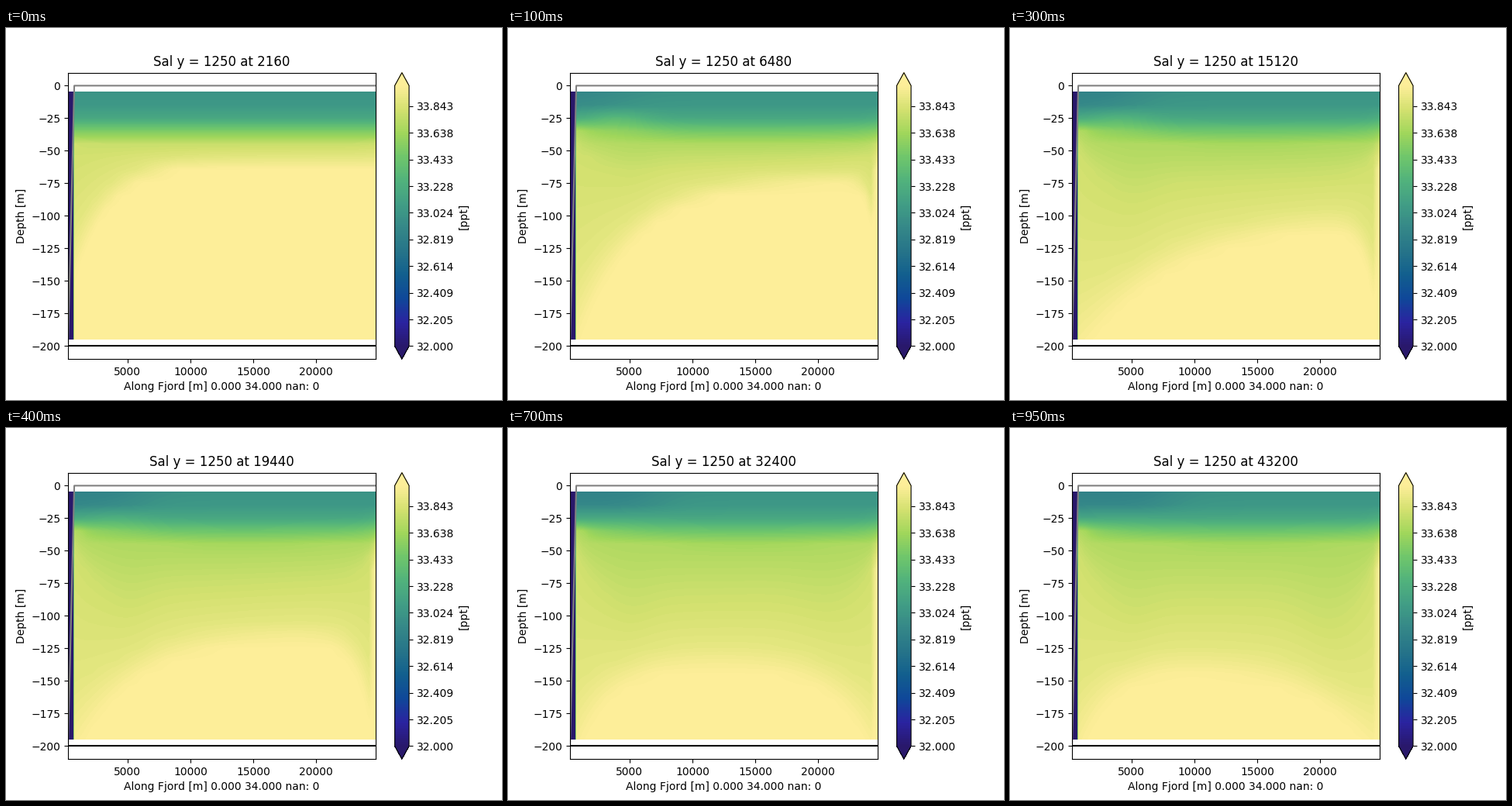
Recreate the animation shown at these times as a matplotlib script. Size 640 by 480 pixels, loop 1000 ms.

```python
import numpy as np
import matplotlib.pyplot as plt
from matplotlib.animation import FuncAnimation
from matplotlib.colors import LinearSegmentedColormap

FRAMES = 20
STEP_SECONDS = 2160
WALL, EDGE = 0.75, 24.75  # km

plt.rcParams["text.kerning_factor"] = 6

HALINE = LinearSegmentedColormap.from_list("haline", [
    "#29186b", "#2a23a0", "#0f4799", "#125f8e", "#267489", "#358888",
    "#419d85", "#51b27c", "#6fc66b", "#a0d65b", "#d4e170", "#fdee99"])
LEVELS = np.linspace(32, 34, 128)

x_grid = np.arange(250, 24751, 500)
z_grid = np.arange(-5, -196, -10)
x = x_grid / 1000


def grow(step, scale):
    return 1 - np.exp(-step / scale)


def hump(center, width):
    return np.exp(-((x - center) / width) ** 2)


def from_wall(width):
    return np.exp(-np.maximum(x - WALL, 0) / width)


def from_edge(width):
    return np.exp(-(EDGE - x) / width)


def pycnocline(step):
    bulge = np.sqrt(np.sin(np.pi * x / 25))
    return 41 + 6 * grow(step, 2.5) * bulge - 9 * grow(step, 1) * from_wall(4)


def middle_depth(step):
    late = np.clip((step - 9) / 10, 0, 1)
    shelf = (46 + 44 * grow(step, 6)
             + 10 * grow(step, 2) * hump(5, 2.2)
             + 18 * late * hump(21, 3)
             - 0.5 * grow(step, 2) * (1 - late) * (x - 12))
    return 45 + (shelf - 45) * (1 - 0.9 * from_wall(1.5)) * (1 - from_edge(1))


def deep_depth(step):
    floor = 60 + 80 * min(1, step / 11)
    wall = 150 + 60 * grow(step, 1)
    plume_width = 2.5 + 5.5 * np.exp(-((step - 5) / 3) ** 2)
    sink_width = 0.5 + 4.5 * (step / 19) ** 2
    return (floor + (wall - floor) * from_wall(plume_width)
            + 65 * grow(step, 3) * np.exp((x - 24.25) / sink_width))


def salinity(step):
    upper, middle, deep = pycnocline(step), middle_depth(step), deep_depth(step)
    middle = np.maximum(middle, upper + 4)
    deep = np.maximum(deep, middle + 10)
    # The open boundary keeps the undisturbed profile.
    upper[-1], middle[-1], deep[-1] = 41, 45.5, 60

    reach = 4 + 4 * step / 19
    surface = 0.5 - 0.075 * grow(step, 1.5) / (1 + np.exp((x - reach) / 1.3))
    # A passing wave lifts the upper layer near the wall.
    lift = (2 * step * np.exp(1 - step / 3) * hump(4, 3)
            + 2.5 * grow(step, 1) * from_edge(0.8))
    green = np.minimum(30, 0.88 * upper) - lift

    field = np.zeros((len(z_grid), len(x)))
    for i in range(1, len(x)):
        d, m, h, g = upper[i], middle[i], deep[i], green[i]
        depths = [5, 14, 22 - 0.7 * lift[i], g, g + 0.45 * (d - g), d,
                  m, m + 0.65 * (h - m), h, h + 20]
        values = [surface[i], surface[i] + 0.015, 0.545, 0.65, 0.75, 0.84,
                  0.9, 0.945, 1.0, 1.01]
        field[:, i] = 32 + 2 * np.interp(-z_grid, depths, values)
    return field


fig, ax = plt.subplots(figsize=(6.4, 4.8), dpi=100)


def draw(step):
    ax.clear()
    filled = ax.contourf(x_grid, z_grid, salinity(step), LEVELS,
                         cmap=HALINE, extend="both")
    ax.plot([250, 24750], [-200, -200], color="black", lw=1.5)
    ax.plot([250, 750, 24750], [-200, 0, 0], color="gray", lw=1.5)
    ax.set_xlim(250, 24750)
    ax.set_ylim(-210, 10)
    ax.set_xticks(range(5000, 20001, 5000))
    ax.set_yticks(range(-200, 1, 25))
    ax.set_title(f"Sal y = 1250 at {STEP_SECONDS * (step + 1)}")
    ax.set_xlabel("Along Fjord [m] 0.000 34.000 nan: 0")
    ax.set_ylabel("Depth [m]")
    return filled


bar = fig.colorbar(draw(0), ax=ax, ticks=LEVELS[::13], format="%.3f")
bar.set_label("[ppt]")
bar.ax.minorticks_off()

animation = FuncAnimation(fig, draw, frames=FRAMES, interval=50,
                          init_func=lambda: None, repeat=True, repeat_delay=0)
plt.show()
```
